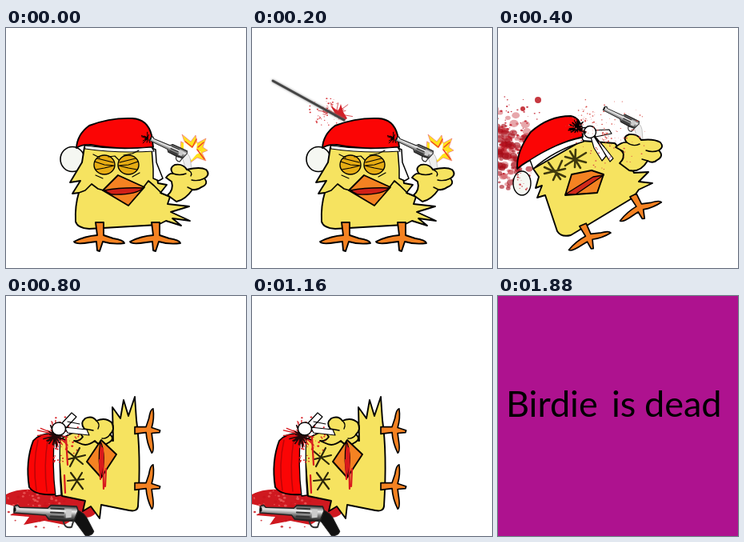
An HTML page with a canvas for the animation above (2200 ms loop, 300 by 300 pixels).

```html
<!DOCTYPE html>
<html lang="en">
<head>
<meta charset="utf-8">
<style>
html, body { margin: 0; height: 100%; overflow: hidden; background: #fff; }
canvas { display: block; }
</style>
</head>
<body>
<canvas id="stage" width="300" height="300"></canvas>
<script>
const ctx = document.getElementById('stage').getContext('2d');
const YELLOW = '#f6e360', ORANGE = '#f48222', RED = '#fb0505', BLOOD = '#c8101a', FLUFF = '#f5f7f2';

function shape(d, fill, line = 1.9, ink = '#000') {
  const p = new Path2D(d);
  if (fill) { ctx.fillStyle = fill; ctx.fill(p); }
  if (line) { ctx.lineWidth = line; ctx.strokeStyle = ink; ctx.stroke(p); }
}

function oval(x, y, rx, ry, fill, line = 0) {
  ctx.beginPath();
  ctx.ellipse(x, y, rx, ry, 0, 0, 7);
  ctx.fillStyle = fill;
  ctx.fill();
  if (line) { ctx.lineWidth = line; ctx.strokeStyle = '#000'; ctx.stroke(); }
}

function at(x, y, deg, size, draw) {
  ctx.save();
  ctx.translate(x, y);
  ctx.rotate(deg * Math.PI / 180);
  ctx.scale(size, size);
  draw();
  ctx.restore();
}

function seeded(s) {
  return () => (s = s * 16807 % 2147483647) / 2147483647;
}

// Drops that get sparser away from the centre
function spray(x, y, rx, ry, count, size, seed, color = BLOOD) {
  const rnd = seeded(seed * 7919);
  rnd();
  for (let i = 0; i < count; i++) {
    const a = rnd() * 6.283, r = rnd(), s = size * (0.3 + rnd() * 0.7);
    oval(x + Math.cos(a) * r * rx, y + Math.sin(a) * r * ry, s, s * 0.8, color);
  }
}

// Scratchy strokes out of one point
function scratch(x, y, r, count, seed, color = '#000', line = 1) {
  const rnd = seeded(seed * 6151);
  rnd();
  ctx.beginPath();
  for (let i = 0; i < count; i++) {
    const a = rnd() * 6.283, l = r * (0.3 + rnd() * 0.7);
    ctx.moveTo(x, y);
    ctx.lineTo(x + Math.cos(a) * l, y + Math.sin(a) * l * 0.8);
  }
  ctx.lineWidth = line;
  ctx.strokeStyle = color;
  ctx.stroke();
}

function foot(x, y, deg, size) {
  at(x, y, deg, size, () => shape('M-5 0L-3 16Q-18 17 -32 24Q-30 28 -12 25L-4 24L-3 35L0 36L4 24Q17 28 31 26Q30 22 17 20L5 16L5 0Z', ORANGE));
}

function gun(x, y, deg, size, grip) {
  at(x, y, deg, size, () => {
    shape('M70 -6Q84 -6 91 4L101 21Q99 27 91 27L77 10L66 9Z', grip, 1, grip === '#111' ? '#222' : '#aaa');
    shape('M62 9Q64 20 73 17L75 9', null, 2, '#333');
    const steel = ctx.createLinearGradient(0, -9, 0, 10);
    [[0, '#333'], [0.35, '#eee'], [0.6, '#888'], [1, '#111']].forEach(s => steel.addColorStop(...s));
    shape('M0 -5L4 -7L7 -4L42 -5L46 -9L64 -9L78 -9L80 -4L76 8L64 10L44 9L40 4L0 3Z', steel, 1.5, '#222');
    shape('M3 -2L40 -2', null, 1.4, '#ddd');
    shape('M46 -5L62 -5M46 0L62 0M46 5L62 5', null, 2, '#333');
    shape('M65 -5L72 -5L72 5L65 6Z', '#ccc', 0);
    oval(1, -1, 1.5, 3, '#111');
  });
}

function upright() {
  oval(83, 164, 15, 15.5, FLUFF, 1.6);
  shape('M98 149L95 168L80 193L93 191L83 207L91 206Q86 222 87 242Q89 250 104 251L190 246L200 241L219 247L208 238L230 241L206 230L229 223L202 220L205 211L193 206L201 196L190 194L183 151Z', YELLOW);
  shape('M91 206L99 203L107 195L115 201L122 203M172 199L178 191L185 197L195 207', null, 1.7);
  foot(117, 243, 0, 1);
  foot(187, 243, 0, 1);
  shape('M182 150L184 176L184 188L191 191L196 188L188 168L187 152Z', '#fff', 1.5);
  shape('M88 150Q89 133 104 122Q130 112 158 113Q177 114 182 134L184 149Q142 153 106 146Q95 145 88 150Z', RED);
  shape('M98 147Q140 153 182 149L185 154Q140 157 99 151Z', '#fff', 1.2);
  scratch(177, 138, 10, 13, 4);

  for (const [x, dir] of [[123, 1], [153, -1]]) {
    oval(x, 171, 13, 12, '#e6ac14', 1.4);
    at(x, 171, 0, 1, () => {
      ctx.scale(dir, 1);
      shape('M-12 -4L0 0L12 1L0 4L-11 6M-9 -8L11 -3', null, 1.2);
    });
  }
  shape('M109 158L117 162M128 161L136 160L141 165M147 159L158 157L166 153M112 184L121 188M158 186L167 181', null, 1.2);
  shape('M140 184L173 199L153 222L121 203Z', ORANGE);
  shape('M123 203Q144 199 172 200Q162 209 132 208Z', '#d02018', 1.4);

  shape('M219 142L224 145L220 133L231 142L237 134L239 144L250 138L246 149L252 153L245 156L250 166L239 162L231 168L228 158L218 154Z', '#ffe21c', 0.8, '#ef8080');
  shape('M222 141L232 150L239 143L238 152L244 155L238 158L232 165L222 158Z', '#fff', 0);
  shape('M224 142L233 149L238 139M239 152L248 164M240 149L247 143', null, 1.5, '#f0412a');
  gun(180, 139, 24, 0.62, '#eee');
  shape('M200 187Q204 181 209 182Q203 175 211 171Q221 169 226 177Q243 173 250 177Q256 183 248 188Q254 195 244 199Q239 203 233 202Q224 215 213 217L202 209Q210 202 207 192Z', YELLOW);
  shape('M209 182Q217 185 225 182M226 177Q234 180 231 185M232 190Q240 192 248 188M227 199L233 202', null, 1.4);
}

function exitShot() {
  spray(94, 105, 24, 17, 75, 1.3, 3, '#d83a40');
  scratch(105, 107, 25, 16, 6, '#d9555a', 1);
  shape('M116 115L92 104L104 107L98 97L108 104L111 95L114 105L119 113Z', '#d32028', 0);
  ctx.save();
  ctx.shadowColor = '#777';
  ctx.shadowBlur = 3;
  shape('M26 66L115 115', null, 2.8, '#444');
  ctx.restore();
}

function falling() {
  spray(8, 145, 42, 52, 100, 6, 11, 'rgba(195,35,45,.4)');
  spray(4, 160, 38, 42, 70, 6, 13, 'rgba(165,10,22,.6)');
  spray(16, 138, 50, 56, 110, 1.8, 17, 'rgba(190,20,35,.8)');
  oval(50, 90, 4, 4, '#c63840');
  oval(31, 101, 3, 3, '#c63840');

  oval(30, 194, 11, 15, FLUFF, 1.4);
  spray(28, 194, 10, 14, 14, 1.5, 19, '#d05058');
  shape('M44 176L51 186L47 200L55 197L49 212L59 209L63 221L74 254Q79 262 91 259L169 212L176 202L193 194L176 192L188 180L170 181L160 160L146 144L105 141Z', YELLOW);
  foot(106, 246, -24, 0.9);
  foot(169, 209, -26, 0.9);
  shape('M24 176Q23 154 41 130Q63 110 91 110Q105 112 106 136Q72 144 47 163Q37 165 24 176Z', RED);
  shape('M40 165Q74 143 105 137L107 142Q70 153 44 176Z', '#fff', 1.4);
  shape('M115 133L120 150L130 166L135 160L121 135ZM117 131L133 149L144 163L140 167ZM119 128L139 127L142 132L122 136Z', '#fff', 1.2);
  oval(115, 130, 7.5, 7.5, '#fff', 1.4);
  scratch(100, 125, 13, 26, 5, '#000', 1.5);

  shape('M58 182L84 176M63 168L78 189M58 174L84 186M69 190L80 166M84 161L110 168M90 154L103 175M84 172L110 156M97 152L96 174', null, 2.6, '#3f390d');
  shape('M92 183L117 178L132 183L124 206L84 209Z', ORANGE);
  shape('M84 208L119 186L132 184L97 208Z', '#d22a1b', 1.4);

  gun(132, 101, 26, 0.6, '#eee');
  shape('M147 149Q155 142 161 143Q155 136 164 133Q175 132 179 140Q195 138 203 143Q208 149 201 153Q208 160 199 165Q194 170 187 166Q178 181 164 178L152 169Q159 163 156 154Z', YELLOW);
  shape('M161 143Q169 149 177 145M185 153Q193 156 201 153M180 164L187 166', null, 1.4);
  spray(133, 133, 58, 48, 120, 1.1, 23, '#d74a45');
  spray(109, 116, 25, 18, 45, 1.2, 29, '#d74a45');
}

function lying() {
  shape('M0 248Q18 239 41 243L78 246Q102 257 113 269Q110 279 88 277L73 286L48 281L22 286L29 276L5 274L20 265L0 260Z', '#cf1920', 0);
  spray(51, 264, 64, 27, 90, 2.2, 31, 'rgba(200,20,28,.8)');
  spray(35, 255, 36, 12, 25, 2, 37, '#e75050');

  shape('M133 139L143 153L147 130L153 150L161 126L163 155Q169 196 165 263Q164 270 154 268L119 261L117 278L106 263L96 269L99 256L70 250L65 180L90 168L134 181Z', YELLOW);
  foot(161, 168, -90, 0.88);
  foot(161, 238, -90, 0.88);
  shape('M62 172Q42 171 34 181Q24 207 29 239Q37 250 62 248Z', RED);
  shape('M52 181Q47 212 51 244M40 180Q33 211 38 243', null, 1.5, '#ba0508');
  shape('M61 173L68 173Q66 212 69 249L62 250Q57 211 61 173Z', '#fff', 1.3);
  shape('M85 181Q92 182 96 176Q90 169 98 166Q92 159 99 153Q108 149 113 156Q124 151 132 158Q137 167 130 173Q137 179 127 184Q119 190 111 181Q101 189 92 184Z', YELLOW);
  shape('M113 156Q118 160 115 166M98 166L109 168M120 178Q126 179 130 173', null, 1.4);

  spray(70, 180, 24, 30, 60, 1.5, 41, '#d7191e');
  scratch(62, 173, 24, 22, 8, '#d7191e', 1.3);
  scratch(61, 175, 19, 28, 12, '#250808', 1.6);
  shape('M69 160L82 146L88 151L73 167ZM73 164L101 167L104 174L77 171Z', '#fff', 1.2);
  oval(66, 166, 8.5, 8, '#fff', 1.4);
  shape('M77 157L92 160', null, 1.2);

  shape('M77 194L96 210M92 190L80 213M78 204L99 199M81 221L96 241M95 221L82 242M77 231L97 229', null, 2.2, '#2b260a');
  shape('M119 180L138 198L119 227L101 207Z', ORANGE);
  shape('M118 181Q126 201 119 227Q114 207 118 181Z', '#da1a1b', 1.2);
  shape('M121 190L122 241M117 205L118 229M125 216L124 238M75 177L77 211M73 224L74 246', null, 2.2, '#d8191e');
}

function title() {
  ctx.fillStyle = '#ae128f';
  ctx.fillRect(0, 0, 300, 300);
  ctx.fillStyle = '#000';
  ctx.font = '45px Lato, sans-serif';
  [['Birdie', 10], ['is', 142], ['dead', 183]].forEach(([word, x]) => ctx.fillText(word, x, 151));
}

const scenes = [
  [200, upright],
  [400, () => { upright(); exitShot(); }],
  [600, falling],
  [800, () => { lying(); gun(60, 270, -60, 0.8, '#111'); }],
  [1400, () => { lying(); gun(10, 268, 3, 1, '#111'); }],
  [2200, title]
];

ctx.lineJoin = ctx.lineCap = 'round';
const start = performance.now();

function tick() {
  const t = (performance.now() - start) % 2200;
  ctx.fillStyle = '#fff';
  ctx.fillRect(0, 0, 300, 300);
  scenes.find(([end]) => t < end)[1]();
  requestAnimationFrame(tick);
}
tick();
</script>
</body>
</html>
```
